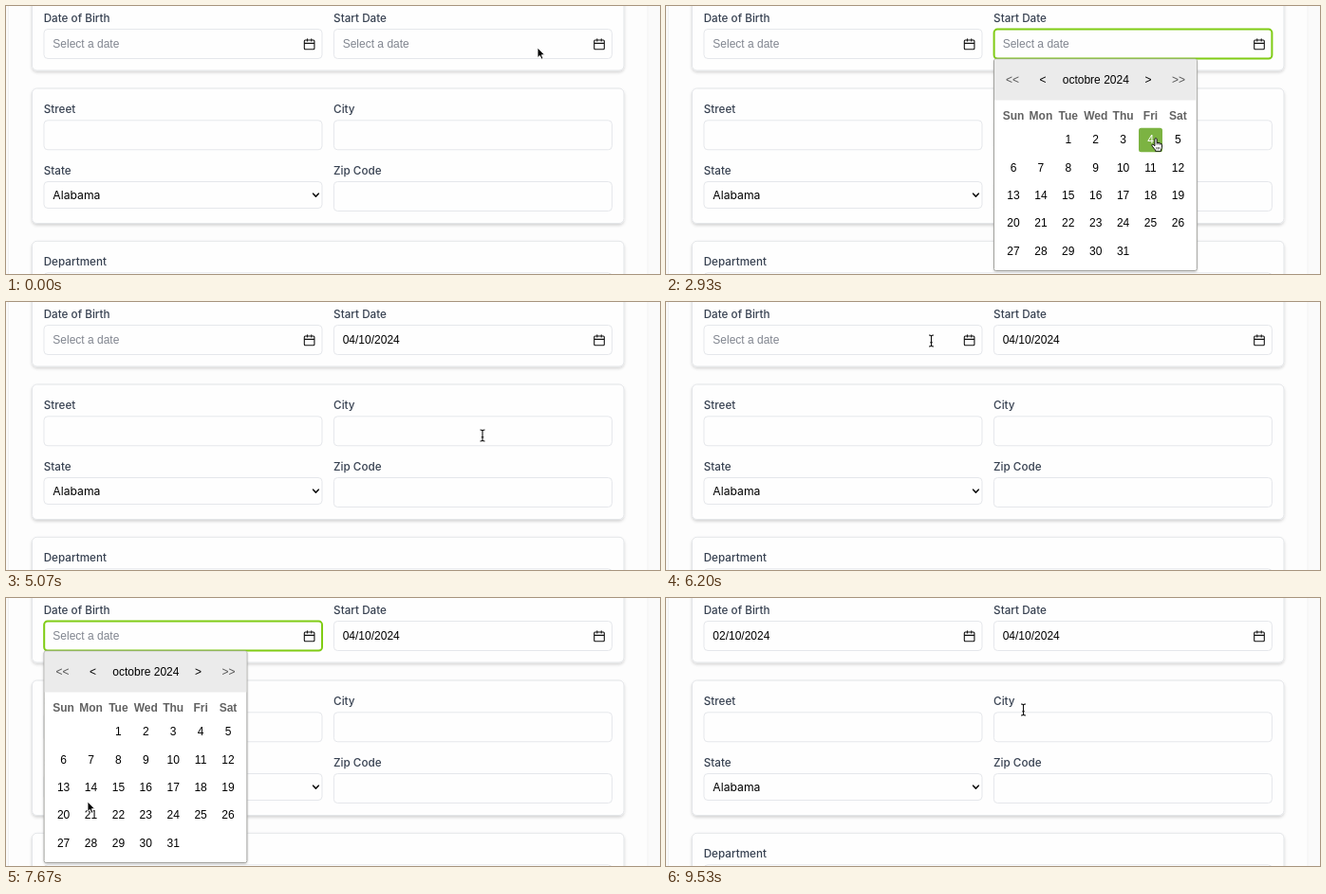
An HTML page for the animation above (9.59 s loop, 689 by 283 pixels).

```html
<!DOCTYPE html>
<html lang="en">
<head>
<meta charset="utf-8">
<title>Date picker form</title>
<style>
  html, body { margin: 0; width: 100%; height: 100%; overflow: hidden; background: #fdfdfd; }
  svg { display: block; width: 689px; height: 283px; }
  text { font: 12px "Liberation Sans", Arial, sans-serif; fill: #000; }
  .label { font: 500 11.7px Inter, sans-serif; fill: #374151; }
  .choice { font: 12.2px Inter, sans-serif; }
  .hint { fill: #80858f; }
  .mid { text-anchor: middle; }
  .week { font-weight: bold; fill: #626262; }
  .far { fill: #555; }
  .card { fill: #fefefe; stroke: #e3e5e8; filter: url(#cardShadow); }
  .field { fill: #fefefe; stroke: #e5e7eb; }
  .ring { fill: none; stroke: #80cc14; stroke-width: 2; }
  .icon { fill: none; stroke: #111; stroke-width: 1.1; stroke-linecap: round; stroke-linejoin: round; }
</style>
</head>
<body>
<svg id="stage" viewBox="0 0 689 283">
  <defs>
    <filter id="cardShadow" x="-5%" y="-10%" width="110%" height="125%">
      <feDropShadow dx="0" dy="1.8" stdDeviation="1.6" flood-opacity=".16"/>
    </filter>
    <filter id="popShadow" x="-5%" y="-5%" width="110%" height="112%">
      <feDropShadow dx="0" dy="1" stdDeviation="1" flood-opacity=".2"/>
    </filter>
  </defs>
</svg>
<script>
const LOOP = 9590, FRAME = 1000 / 15;
const COL = 28.9, ROW = 29.35, CELL = 25;
const stage = document.getElementById('stage');

function add(parent, tag, attrs, text) {
  const node = document.createElementNS('http://www.w3.org/2000/svg', tag);
  for (const key in attrs) node.setAttribute(key, attrs[key]);
  if (text !== undefined) node.textContent = text;
  parent.append(node);
  return node;
}
const box = (parent, x, y, width, height, attrs) =>
  add(parent, 'rect', { x, y, width, height, ...attrs });
const write = (parent, x, y, text, cls = '') =>
  add(parent, 'text', { x, y, class: cls }, text);
const show = (node, on) => node.setAttribute('visibility', on ? 'visible' : 'hidden');

// Page, cards and plain fields
box(stage, 0, 0, 689, 283, { fill: '#fafafa' });
box(stage, 2.5, -5, 673.5, 300, { fill: '#fdfdfd', stroke: '#f1f1f2' });
for (const [y, h] of [[-40, 108], [87, 142.5], [248.3, 90]])
  box(stage, 27.5, y, 623.5, h, { rx: 5, class: 'card' });

const field = (x, y, h, w = 293) => box(stage, x, y, w, h, { rx: 4, class: 'field' });
const LEFT = 40, RIGHT = 345.4;
field(LEFT, 120.8, 31);
field(RIGHT, 120.8, 31);
field(LEFT, 185.5, 28);
field(RIGHT, 185.5, 31);
field(LEFT, 281.8, 31, 598.4);

for (const [x, y, text] of [
  [LEFT, 16.6, 'Date of Birth'], [RIGHT, 16.6, 'Start Date'],
  [LEFT, 112.8, 'Street'], [RIGHT, 112.8, 'City'],
  [LEFT, 177.8, 'State'], [RIGHT, 177.8, 'Zip Code'],
  [LEFT, 274, 'Department']
]) write(stage, x - 0.3, y, text, 'label');
write(stage, 49.3, 204, 'Alabama', 'choice');
add(stage, 'path', { d: 'M323.6 198.2l2.8 2.9 2.8-2.9', class: 'icon', style: 'stroke-width:1.6' });

// Date inputs, each with its own popup calendar
function calendar(left) {
  const g = add(stage, 'g');
  box(g, left + 0.5, 56, 213.8, 223.5, { rx: 2, fill: '#fff', stroke: '#a4a4a0', filter: 'url(#popShadow)' });
  box(g, left + 1, 56.5, 212.8, 43, { fill: '#ebebeb' });
  for (const [x, text, cls] of [
    [20, '<<', 'far'], [52, '<', ''], [107.8, 'octobre 2024', ''], [163, '>', ''], [195, '>>', 'far']
  ]) write(g, left + x, 81.8, text, 'mid ' + cls);
  ['Sun', 'Mon', 'Tue', 'Wed', 'Thu', 'Fri', 'Sat'].forEach((day, i) =>
    write(g, left + 21 + i * COL, 119.6, day, 'mid week'));
  const mark = box(g, 0, 0, CELL, CELL + 0.5, { rx: 2.5, fill: '#7cb342' });
  const days = [];
  for (let day = 1; day <= 31; day++) {
    const slot = day + 1;
    days[day] = write(g, left + 21 + slot % 7 * COL, 145.3 + Math.floor(slot / 7) * ROW, day, 'mid');
  }
  return { g, mark, days, left };
}

function dateInput(x, value, open, close) {
  field(x, 24.5, 31);
  const text = write(stage, x + 9.3, 44.2, '');
  add(stage, 'path', {
    class: 'icon',
    d: `M${x + 275.3} 36h8.6q1 0 1 1v7.7q0 1-1 1h-8.6q-1 0-1-1v-7.7q0-1 1-1zM${x + 274.5} 39.4h10.2M${x + 277.4} 34.8v2.2M${x + 281.8} 34.8v2.2`
  });
  const ring = box(stage, x + 0.2, 24.6, 292.8, 31, { rx: 3.5, class: 'ring' });
  return { x, value, open, close, text, ring };
}
const inputs = [
  dateInput(LEFT, '02/10/2024', 6400, 8800),
  dateInput(RIGHT, '04/10/2024', 1065, 4865)
];
for (const input of inputs) input.cal = calendar(input.x - 0.4);

// Pointers, hot spot at the origin
const pointers = {
  arrow: 'M0 0V10.6L2.4 8.4 4.1 12.2 5.9 11.4 4.3 7.7H7.5Z',
  hand: 'M-1.1 .8Q-1 -.4 0 -.4T1.1 .8V4.6Q1.8 3.9 3 4.7 4.2 4.2 4.9 5.3 6.5 5 6.5 6.8V9.2Q6.3 10.8 5.4 12V13.3H-.4V12.2Q-2.2 10.3-4 7.6-4.5 6.4-3.4 6.2-2.3 6.2-1.1 7.8Z',
  beam: 'M-2.5-6Q-.4-6 0-5 .4-6 2.5-6M0-5V5M-2.5 6Q-.4 6 0 5 .4 6 2.5 6M-1.3 1.8H1.3'
};
for (const kind in pointers) {
  const d = pointers[kind], g = add(stage, 'g');
  if (kind === 'arrow') add(g, 'path', { d, fill: '#000', stroke: '#fff', 'stroke-width': 0.9 });
  if (kind === 'hand') {
    add(g, 'path', { d, fill: '#fff', stroke: '#000', 'stroke-width': 0.9, 'stroke-linejoin': 'round' });
    add(g, 'path', { d: 'M1.1 4.6V6.6M3 4.9V6.7M4.9 5.4V7M.8 9V11.3M2.4 9V11.3M4 9V11.3', stroke: '#000', 'stroke-width': 0.6 });
  }
  if (kind === 'beam') {
    add(g, 'path', { d, fill: 'none', stroke: '#fff', 'stroke-width': 2.2 });
    add(g, 'path', { d, fill: 'none', stroke: '#111', 'stroke-width': 1.1 });
  }
  pointers[kind] = g;
}

// Pointer path: time, x, y
const path = [
  [0, 560, 44], [330, 565, 47.5], [560, 565, 47.5], [730, 550, 41], [1410, 550, 41],
  [1800, 462, 172], [2067, 421, 153], [2430, 424, 146], [2933, 516, 140],
  [3400, 520, 196], [3700, 432, 205], [4000, 525, 168.5], [4400, 508, 148],
  [4665, 502, 141], [5610, 502, 141], [6200, 279.5, 41], [6550, 279.5, 41],
  [7150, 180, 130], [7667, 86, 215], [8100, 200, 206], [8600, 147.5, 141],
  [9340, 147.5, 141], [9533, 376.5, 118], [LOOP, 376.5, 118]
];
function pointerAt(t) {
  const i = Math.max(1, path.findIndex(p => p[0] >= t));
  const [t0, x0, y0] = path[i - 1], [t1, x1, y1] = path[i];
  const u = (t - t0) / (t1 - t0), e = u * u * (3 - 2 * u);
  return [x0 + (x1 - x0) * e, y0 + (y1 - y0) * e];
}

function dayAt(cal, x, y) {
  const col = Math.round((x - cal.left - 21) / COL), row = Math.round((y - 141.4) / ROW);
  const dx = x - cal.left - 21 - col * COL, dy = y - 141.4 - row * ROW;
  const day = row * 7 + col - 1;
  const inside = col >= 0 && col < 7 && row >= 0 && Math.abs(dx) <= CELL / 2 && Math.abs(dy) <= CELL / 2 + 0.4;
  return inside && day >= 1 && day <= 31 ? day : 0;
}

function kindOnPage(x, y) {
  const inColumn = (x > LEFT && x < 333) || (x > RIGHT && x < 638);
  const onText = (y > 24 && y < 56) || (y > 101 && y < 152);
  return inColumn && onText ? 'beam' : 'arrow';
}

const clamp = v => Math.min(1, Math.max(0, v));

function draw(time) {
  const t = Math.floor((time + 5) / FRAME) * FRAME;
  const [x, y] = pointerAt(t);
  let kind = t < 190 ? 'arrow' : kindOnPage(x, y);

  for (const { value, open, close, text, ring, cal } of inputs) {
    const isOpen = t >= open && t < close, done = t >= close;
    text.textContent = done ? value : 'Select a date';
    text.setAttribute('class', done ? '' : 'hint');
    ring.setAttribute('opacity', clamp((t - open + 60) / 160) * (1 - clamp((t - close) / 160)));
    cal.g.style.display = isOpen ? '' : 'none';
    if (!isOpen) continue;

    const hover = dayAt(cal, x, y);
    cal.days.forEach((node, day) => { node.style.fill = day === hover ? '#fff' : ''; });
    show(cal.mark, hover > 0);
    if (hover) {
      const slot = hover + 1;
      cal.mark.setAttribute('x', cal.left + 21 + slot % 7 * COL - CELL / 2);
      cal.mark.setAttribute('y', 128.7 + Math.floor(slot / 7) * ROW);
    }
    if (y > 56 && x > cal.left && x < cal.left + 214)
      kind = hover || y < 99 ? 'hand' : 'arrow';
  }

  for (const name in pointers) {
    show(pointers[name], name === kind);
    pointers[name].setAttribute('transform', `translate(${x} ${y})`);
  }
}

const start = performance.now();
function tick() {
  draw((performance.now() - start) % LOOP);
  requestAnimationFrame(tick);
}
tick();
</script>
</body>
</html>
```
